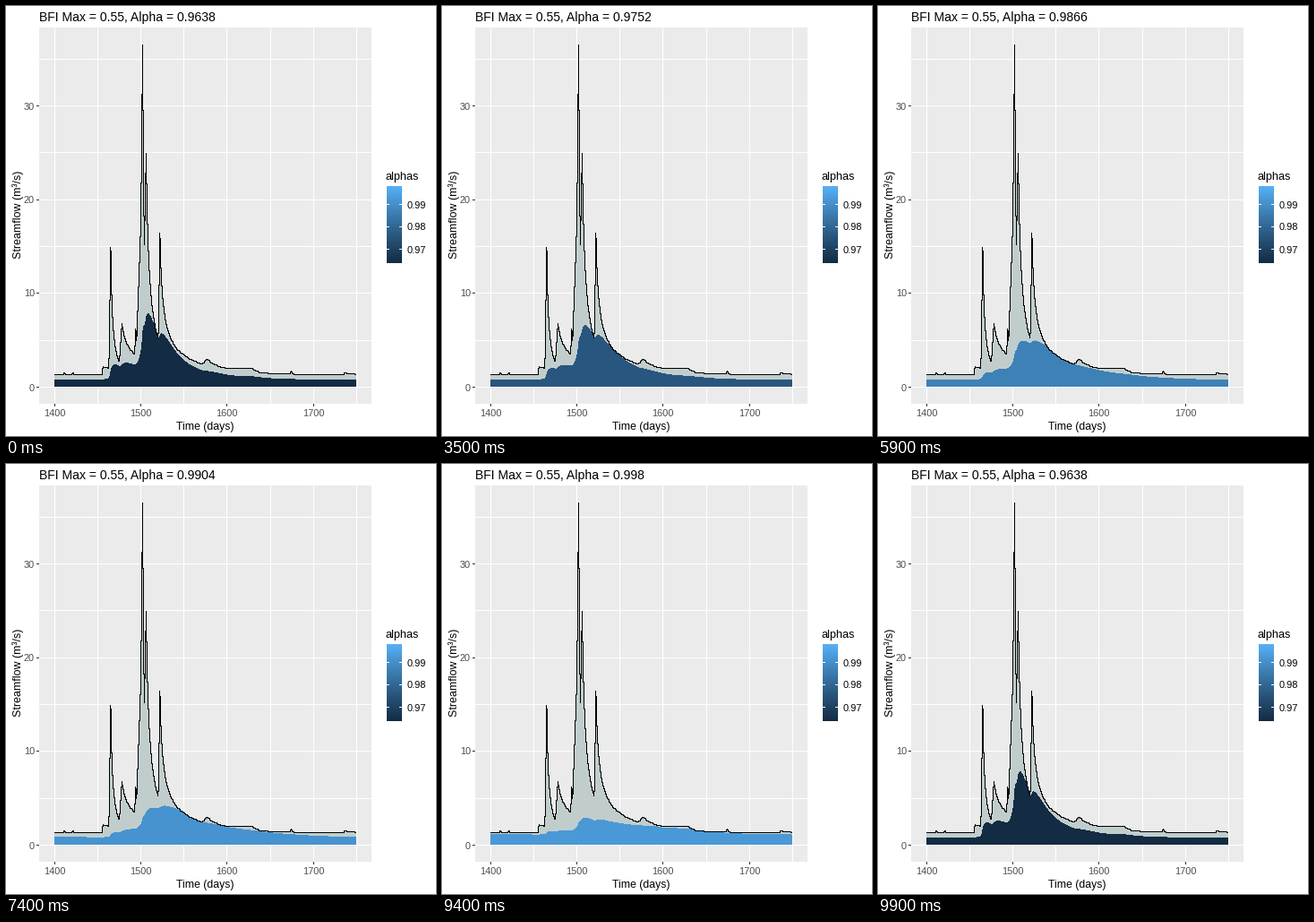
These frames come from a looping animation (480x480 px, 10 s). A matplotlib script:

```python
import numpy as np
import matplotlib.pyplot as plt
from matplotlib.animation import FuncAnimation
from matplotlib.patches import Polygon, Rectangle

SIZE, DPI = 480, 96
BFI_MAX = 0.55
STATES = 10
ALPHAS = 0.9638 + 0.0038 * np.arange(STATES)
LOW, HIGH = "#132B43", "#56B1F7"

days = np.arange(351)   # counted from day 1400
cols = np.arange(54, 391)   # pixel columns of the plotted data


def px(day):
    return 53.8 + 0.9633 * day


def py(value):
    return 424.85 - 10.46 * value


def flood(day, peak, rise=2, spread=5, power=0.4):
    """Linear rise to the peak, then a power-law recession."""
    t = days - day
    up = np.clip(1 + t / rise, 0, 1)
    down = (1 + np.maximum(t, 0) / spread) ** -power
    return peak * up * down


def streamflow():
    curves = [
        1.32 - 0.0004 * days,
        flood(11, 1.5), flood(21, 1.5),
        flood(56, 2.15, 1, 10, 0.15),
        flood(65, 15, 2.5, 2.1, 1),
        flood(78, 6.8, 5, 3.5, 0.4),
        flood(94, 6.2, 3, 3, 1),
        flood(100, 17.5, 7, 1.4, 1),
        flood(102, 36.5, 4, 1.4, 1),
        flood(106, 25, 5, 3.7, 1),
        flood(122, 16.5, 2.5, 2.15, 0.6),
        flood(177, 3.05, 30, 6, 0.28),
        flood(229, 2, 500, 4, 0.2),
        flood(274, 1.65), flood(327, 1.3),
        flood(336, 1.55, 2, 5, 0.1),
    ]
    # the gauge reads in coarse steps
    return 0.13 * np.rint(np.max(curves, axis=0) / 0.13)


flow = streamflow()


def baseflow(alpha):
    """Eckhardt recursive digital filter, started on the tail of an old flood."""
    scale = 1 - alpha * BFI_MAX
    keep = (1 - BFI_MAX) * alpha / scale
    gain = (1 - alpha) * BFI_MAX / scale
    base = BFI_MAX * 1.33 + 280 * (1 - keep) * keep ** 190
    out = []
    for q in flow:
        base = min(keep * base + gain * q, q)
        out.append(base)
    return np.array(out)


def rows(x, values):
    """Pixel rows of a daily series at the horizontal positions x."""
    return np.rint(py(np.interp(x, px(days), values)))


def steps(top, bottom):
    """Polygon that fills each pixel column from top to bottom."""
    x = np.repeat(np.append(cols, cols[-1] + 1), 2)[1:-1]
    y = np.append(np.repeat(top, 2), np.repeat(bottom, 2)[::-1])
    return np.column_stack([np.append(x, x[::-1]), y])


def area(values):
    return steps(rows(cols, values), np.full(len(cols), 425))


# sRGB to XYZ (D65), then cube roots of XYZ to Lab
TO_XYZ = np.array([[0.4124, 0.3576, 0.1805],
                   [0.2126, 0.7152, 0.0722],
                   [0.0193, 0.1192, 0.9505]])
WHITE = TO_XYZ.sum(axis=1)


def to_lab(color):
    rgb = np.array([int(color[i:i + 2], 16) for i in (1, 3, 5)]) / 255
    lin = np.where(rgb > 0.04045, ((rgb + 0.055) / 1.055) ** 2.4, rgb / 12.92)
    t = TO_XYZ @ lin / WHITE
    fx, fy, fz = np.where(t > 0.008856, np.cbrt(t), 7.787 * t + 16 / 116)
    return np.array([116 * fy - 16, 500 * (fx - fy), 200 * (fy - fz)])


def to_rgb(lab):
    fy = (lab[0] + 16) / 116
    f = np.array([fy + lab[1] / 500, fy, fy - lab[2] / 200])
    t = np.where(f > 0.2069, f ** 3, (f - 16 / 116) / 7.787)
    lin = np.clip(np.linalg.solve(TO_XYZ, t * WHITE), 0, 1)
    rgb = np.where(lin > 0.0031308, 1.055 * lin ** (1 / 2.4) - 0.055, 12.92 * lin)
    return np.clip(rgb, 0, 1)


LAB_LOW, LAB_HIGH = to_lab(LOW), to_lab(HIGH)


def ramp(t):
    return to_rgb(LAB_LOW + (LAB_HIGH - LAB_LOW) * t)


plt.rcParams["font.family"] = "Liberation Sans"
fig = plt.figure(figsize=(SIZE / DPI, SIZE / DPI), dpi=DPI, facecolor="white")
ax = fig.add_axes([0, 0, 1, 1])
ax.set(xlim=(0, SIZE), ylim=(SIZE, 0))
ax.axis("off")


def box(x, y, w, h, color, z=1):
    ax.add_patch(Rectangle((x, y), w, h, fc=color, lw=0, aa=False, zorder=z))


def label(x, y, text, size, color="black", **kw):
    return ax.text(x, y, text, fontsize=size * 72 / DPI, color=color,
                   va="baseline", zorder=6, **kw)


def shape(points, color, z):
    return ax.add_patch(Polygon(points, fc=color, lw=0, aa=False, zorder=z))


# panel, grid and axes
box(37, 24, 371, 420, "#EBEBEB")
for day in range(0, 351, 50):
    x = round(px(day))
    box(x, 24, 1, 420, "white", 2)
    if day % 100 == 0:
        box(x, 444, 1, 3, "#333333", 2)
        label(x + 0.5, 458, str(1400 + day), 11, "#4D4D4D", ha="center")
for value in range(0, 36, 5):
    y = round(py(value))
    box(37, y, 371, 1, "white", 2)
    if value % 10 == 0:
        box(34, y, 3, 1, "#333333", 2)
        label(32, y + 4.5, str(value), 11, "#4D4D4D", ha="right")
label(222, 473, "Time (days)", 12.3, ha="center")
label(17, 233, "Streamflow (m³/s)", 12.4, ha="center", rotation=90,
      rotation_mode="anchor")
title = label(37, 17, "", 14.05)

# colour bar
label(424, 194, "alphas", 12.6)
for row in range(86):
    box(425, 201 + row, 17, 1, ramp(1 - (row + 0.5) / 86), 2)
for i, text in enumerate(("0.99", "0.98", "0.97")):
    y = 221 + 25 * i
    box(425, y, 3, 1, "white", 3)
    box(439, y, 3, 1, "white", 3)
    label(448, y + 4.5, text, 11)

# data
samples = rows(cols[:, None] + np.linspace(-0.5, 0.5, 21), flow)
crest = samples.min(axis=1)
shape(steps(crest, np.full(len(cols), 425)), "#C1CDCD", 3)
base_area = shape(area(flow), LOW, 4)
shape(steps(crest, samples.max(axis=1) + 1), "black", 5)
bases = [baseflow(a) for a in ALPHAS]


def arrival(k):
    """Frame at which state k comes to rest; k = STATES closes the loop."""
    return 10 * k - (k > 5)


def draw(frame):
    a = max(k for k in range(STATES + 1) if arrival(k) <= frame) % STATES
    b = (a + 1) % STATES
    length = 7 if a == 0 else 6
    step = max(0, frame - arrival(a + 1) + length) if frame < arrival(STATES) else 0
    p = step / length
    base_area.set_xy(area(bases[a] * (1 - p) + bases[b] * p))
    base_area.set_facecolor(ramp((a * (1 - p) + b * p) / (STATES - 1)))
    shown = ALPHAS[b if step > 3 else a]
    title.set_text(f"BFI Max = {BFI_MAX}, Alpha = {round(shown, 4):g}")
    return base_area, title


anim = FuncAnimation(fig, draw, frames=100, interval=100, repeat=True,
                     repeat_delay=0)
plt.show()
```
